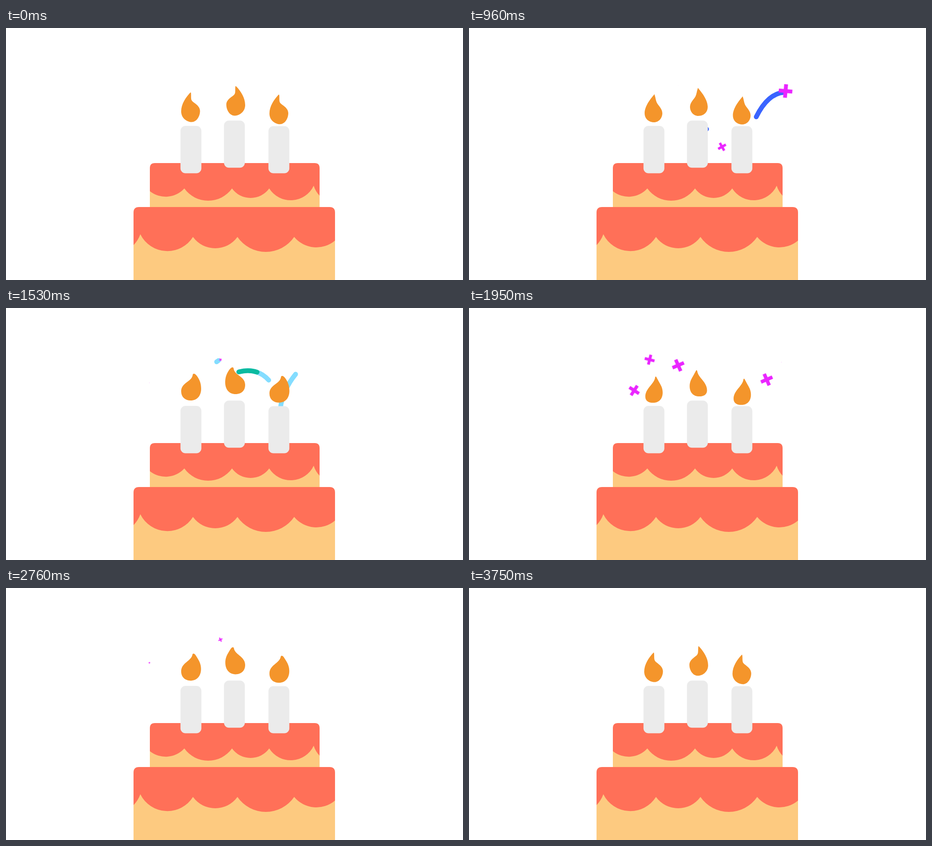
Recreate the animation shown at these times as an HTML page without scripts. Size 1007 by 556 pixels, loop 3780 ms.

```html
<!DOCTYPE html>
<html lang="en">
<head>
<meta charset="utf-8">
<title>Birthday cake</title>
<style>
html, body { margin: 0; width: 100%; height: 100%; overflow: hidden; background: #fff; }
svg { display: block; width: 100%; height: 100%; }

.frosting { fill: #ff7058; }
.sponge { fill: #fdca80; }
.candle { fill: #ebebeb; }

.flame { fill: #f4952b; animation: flicker 3.78s linear infinite; }
@keyframes flicker {
  0%, 33.333%, 66.667%, 100% {
    d: path("M406 142.5C396 153 386 168 386 184C386 200 400 207.5 409 207.5C420 207.5 427.5 195 427.5 183C427.5 171 413 165 410 161C406.5 157 408.5 150 407.5 143C407.5 142 406.5 142 406 142.5Z");
  }
  7.143%, 40.476%, 73.81% {
    d: path("M411.5 147C410 163 386 164 386 184C386 197 395 204 407 204C421 204 430 194 430 178C430 168 427.5 161 424 155C421 150 419 147 416 145.5C414 144.5 412 145 411.5 147Z");
  }
  15.873%, 49.206% {
    d: path("M411 155C411 172 389 179 389 198C389 207 396 209.5 405 209.5C418 209.5 427 202 427 186C427 175 424 169 420 162C418 158 415 155 414 153.5C413 152.5 411.5 153 411 155Z");
  }
  83.333% {
    d: path("M411.5 153C411 171 388.5 177 388.5 195C388.5 205 396 208 405 208C418 208 428 200 428 182C428 174 425 167 421 160C418 155 415.5 153 414 151.5C413 150.5 412 151 411.5 153Z");
  }
  25.397%, 58.73%, 92.063% {
    d: path("M407.5 147.5C401 155 387 172 387 188C387 201 397 208 408 208C418 208 426 199 426 188C426 178 417 171 414 165C411.5 160 411 153 409 147.5C408.7 146 408 146 407.5 147.5Z");
  }
}

/* Streamers draw in, then out, along their path */
.streamers path {
  fill: none; stroke: var(--c); stroke-width: 10.5; stroke-linecap: round;
  stroke-dasharray: 100 300; stroke-dashoffset: 101;
  animation: shoot 3.78s linear var(--t) infinite;
}
.blue { --c: #3a64ff; }
.cyan { --c: #84ddff; }
.teal { --c: #0abaa0; }
@keyframes shoot {
  0% { stroke-dashoffset: 101; }
  7.407% { stroke-dashoffset: 0; }
  14.815%, 100% { stroke-dashoffset: -101; }
}

/* Each spark pops twice per loop */
.sparks path {
  stroke: #ea25ff; stroke-width: 8.5; transform: scale(0);
  animation: pop 3.78s linear var(--t) infinite;
}
@keyframes pop {
  0%, 33.333% { transform: rotate(13deg) scale(0); }
  3.439%, 36.772% { transform: rotate(0deg) scale(1); }
  11.376%, 44.709% { transform: rotate(-30deg) scale(0); }
  11.377% { transform: rotate(13deg) scale(0); }
  100% { transform: rotate(-30deg) scale(0); }
}
</style>
</head>
<body>
<svg viewBox="0 0 1007 556" preserveAspectRatio="none">
  <path class="sponge" d="M317 340H691V400H317ZM281 440H725V556H281Z"/>
  <path class="frosting" d="M317 360V309Q317 298 328 298H680Q691 298 691 309V370A56 56 0 0 1 678 348A56 56 0 0 1 580 354A50.5 50.5 0 0 1 498 354A64.5 64.5 0 0 1 393 354A55.7 55.7 0 0 1 317 360Z"/>
  <path class="frosting" d="M281 479V407Q281 395 293 395H713Q725 395 725 407V469A63.7 63.7 0 0 1 635 461A75.7 75.7 0 0 1 510 461A60.5 60.5 0 0 1 412 461A66.5 66.5 0 0 1 296 455A66 66 0 0 1 281 479Z"/>

  <g class="streamers">
    <g class="blue">
      <path pathLength="100" style="--t:.2s" d="M400 290C385 250 355 212 327 212"/>
      <path pathLength="100" style="--t:.4s" d="M407 215C411 180 436 138 468 116"/>
      <path pathLength="100" style="--t:.54s" d="M606 280C615 235 640 146 694 142"/>
      <path pathLength="100" style="--t:.82s" d="M503 260C512 226 535 208 562 206"/>
    </g>
    <g class="cyan">
      <path pathLength="100" style="--t:.985s" d="M407 215C411 180 436 138 468 116"/>
      <path pathLength="100" style="--t:1.144s" d="M598 200C588 152 553 130 513 141"/>
      <path pathLength="100" style="--t:1.34s" d="M605 219C609 184 634 142 666 120"/>
    </g>
    <g class="teal">
      <path pathLength="100" style="--t:1.07s" d="M598 200C588 152 553 130 513 141"/>
      <path pathLength="100" style="--t:1.94s" d="M500 230C492 203 477 170 459 152"/>
      <path pathLength="100" style="--t:2.72s" d="M505 235C507 205 514 184 523 164"/>
    </g>
  </g>

  <g class="candle">
    <rect x="384.5" y="216" width="46" height="104.5" rx="11"/>
    <rect x="480.3" y="204.3" width="46" height="104" rx="11"/>
    <rect x="578.3" y="216.5" width="46" height="104" rx="11"/>
  </g>

  <path class="flame"/>
  <g transform="matrix(-1 0 0 1 913 -14)"><path class="flame"/></g>
  <g transform="translate(194.5 4.7)"><path class="flame"/></g>

  <g class="sparks">
    <g transform="translate(364 182) rotate(38)"><path style="--t:.513s" d="M-15 0H15M0-15V15"/></g>
    <g transform="translate(461 126.5) rotate(-21)"><path style="--t:.535s" d="M-15 0H15M0-15V15"/></g>
    <g transform="translate(656 158) rotate(-21)"><path style="--t:.535s" d="M-15 0H15M0-15V15"/></g>
    <g transform="translate(557.5 262) rotate(-19)"><path style="--t:.725s" d="M-15 0H15M0-15V15"/></g>
    <g transform="translate(697.5 139) rotate(5)"><path style="--t:.83s" d="M-15 0H15M0-15V15"/></g>
    <g transform="translate(316 165) rotate(10)"><path style="--t:1.11s" d="M-15 0H15M0-15V15"/></g>
    <g transform="translate(472.5 114) rotate(-6)"><path style="--t:1.165s" d="M-15 0H15M0-15V15"/></g>
    <g transform="translate(688.5 119.5) rotate(68)"><path style="--t:1.53s" d="M-15 0H15M0-15V15"/></g>
    <g transform="translate(398 114) rotate(11)"><path style="--t:1.855s" d="M-15 0H15M0-15V15"/></g>
  </g>
</svg>
</body>
</html>
```
